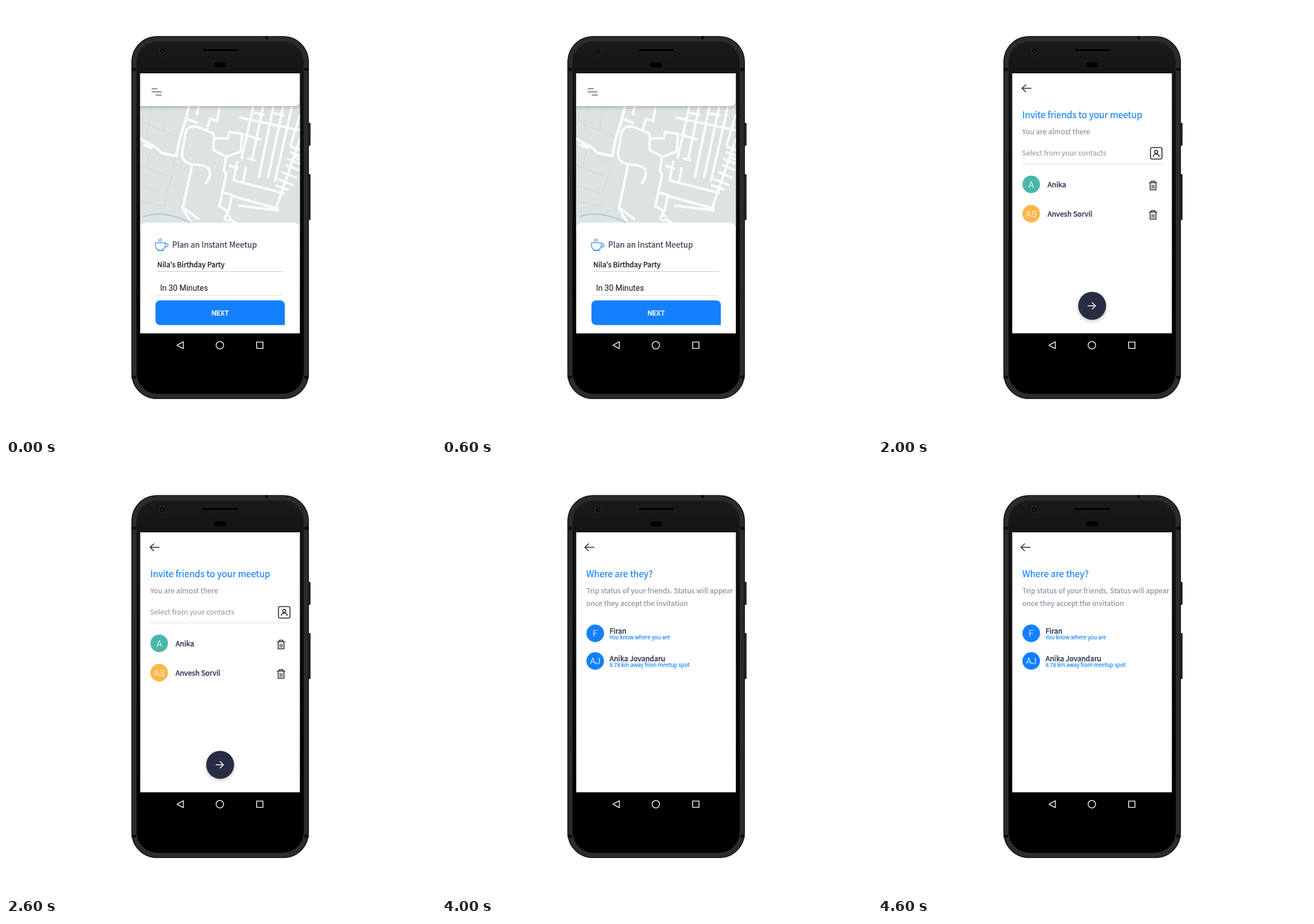
Animation of 748x749 px, one loop 5 s. Source, as an HTML page:

```html
<!DOCTYPE html>
<html lang="en">
<head>
<meta charset="utf-8">
<title>Meetup app tour</title>
<style>
html, body { margin: 0; width: 100%; height: 100%; overflow: hidden; background: #fff; }
svg { display: block; width: 748px; height: 749px; }
text {
  font: 12.4px "Noto Sans CJK JP", "Noto Sans CJK SC", "Open Sans", sans-serif;
  color: #8c8f9f; fill: currentColor; stroke: currentColor; stroke-width: .2;
}
text.title { font-size: 15.5px; color: #1480ff; }
text.dark { color: #222; stroke-width: .4; }
text.name { color: #292d50; stroke-width: .4; }
text.hint { color: #a0a0a0; }
text.note { font-size: 9.35px; color: #1480ff; }
text.bar { font-size: 9.5px; font-weight: 900; color: #fff; stroke-width: .35; }
text.place, text.street, text.initial, text.ui { font-family: Roboto, sans-serif; }
text.place { font-size: 12px; color: #5d8299; stroke: #eef2f2; stroke-width: 1.5; paint-order: stroke; }
text.street { font-size: 10px; color: #53686f; stroke: #fff; stroke-width: 2; paint-order: stroke; }
text.initial { font-size: 15.5px; font-weight: 300; color: #fff; }
.end { text-anchor: end; }
.mid { text-anchor: middle; }
.road, .line { fill: none; stroke: #fff; stroke-linecap: round; stroke-linejoin: round; }
.line { stroke: #2a2a2a; stroke-width: 1.6; }
.blue { fill: #1480ff; }
.lift { filter: drop-shadow(0 2px 3px #0004); }
.screen { display: none; }
.screen.on { display: inline; }
</style>
</head>
<body>
<svg viewBox="0 0 748 749">
<defs>
  <linearGradient id="face" x2="0" y2="1">
    <stop stop-color="#1a1a1a"/><stop offset=".1" stop-color="#141414"/>
    <stop offset=".5" stop-color="#080808"/><stop offset=".85"/>
  </linearGradient>
  <clipPath id="display"><path d="M233.500 117h277.700v451.700H233.500z"/></clipPath>
  <clipPath id="spotMap"><path d="M251 303h243.500v184H251z"/></clipPath>
  <g id="back" class="line"><path d="M266.500 143H251M257 137l-6.500 6 6.500 6"/></g>
  <g id="header">
    <path class="lift" d="M224 107h287v57q0 10-10 10H224z" fill="#fff"/>
    <path class="line" style="stroke:#646b7c" d="M254 143.700h9M254 149.200h16M261 154.700h9.500"/>
  </g>
  <g id="next">
    <circle class="lift" cx="372.500" cy="521" r="24.300" fill="#292d44"/>
    <path class="line" style="stroke:#fff" d="M365.500 521h12.500M372.500 515.500l5.700 5.500-5.700 5.500"/>
  </g>
  <g id="pin">
    <path d="M-5.500 4L0 13 5.500 4z" fill="#9ba3a6"/>
    <circle r="7" fill="#9ba3a6"/>
  </g>
  <g id="bin" class="line">
    <path d="M-6.500-5H6.500M-3-5v-2.500h6V-5M-5-4.500v12h10v-12"/>
    <path d="M-2-1v6M0-1v6M2-1v6" stroke-width="1"/>
  </g>
  <g id="stop"><rect x="-4" y="-4" width="8" height="8" rx="1.500" fill="#eef4f5" stroke="#6295ac" stroke-width="1.500"/><path d="M-2 0h4" stroke="#6295ac"/></g>
</defs>

<!-- Phone -->
<g>
  <rect x="525" y="203" width="4.500" height="40" rx="1" fill="#292929"/>
  <rect x="525" y="292" width="4.500" height="80" rx="1" fill="#292929"/>
  <path d="M529 204v38M529 293v78" stroke="#111"/>
  <rect x="218.300" y="52.500" width="308.500" height="630.500" rx="44" fill="#2b2b2b"/>
  <rect x="219" y="53.200" width="307" height="629" rx="43.300" fill="none" stroke="#151515" stroke-width="1.400"/>
  <path d="M218.500 110h7.500M519 110h7.500M218.500 645h7.500M519 645h7.500M453.500 52.500v5" stroke="#0b0b0b" stroke-width="5"/>
  <rect x="227" y="62" width="291" height="612" rx="37" fill="url(#face)"/>
  <path d="M227 100Q227 62 265 62H480Q518 62 518 100" fill="none" stroke="#202020"/>
  <rect x="342" y="74" width="62" height="5" rx="2.500" stroke="#2b2b2b" stroke-width=".7"/>
  <rect x="362" y="98" width="21" height="8.500" rx="4.200"/>
  <circle cx="272" cy="78" r="5" fill="#080808" stroke="#333"/>
  <path d="M270.500 76.500l3 3" stroke="#777"/>
  <path d="M233.500 568h277.700v43H233.500z"/>
  <g class="line" style="stroke:#e4e4e4">
    <path d="M308.500 583.500v12l-11-6zM436 584h11v11h-11z"/>
    <circle cx="372" cy="589.500" r="6.500"/>
  </g>
</g>

<g clip-path="url(#display)">
<path d="M233 117h279v452H233z" fill="#fff"/>

<!-- Plan -->
<g class="screen">
  <path d="M233 170h279v220H233z" fill="#dde3e3"/>
  <path class="road" style="stroke:#cdd5d6;stroke-width:1" d="M253 175l-4 32 53 21M279 175l-5 42M234 195l15 12-8 34M252 248l-8 33-10-4M244 281l35 14M240 313l35 14M258 250l29 25M294 262l-3 28-12 36-3 22-42-9"/>
  <path class="road" style="stroke-width:4.500" d="M318 175l-6 25-10 32-6 29-26-6-9-9-27-15M241 241l12 6"/>
  <path class="road" style="stroke-width:4" d="M348 308q9-12 6-22-2-8-20-10-29 0-28-21l7-37q5-11 20-8l27 11 2 9M323 279l-15 71 8 6 18 14M307 350l15 27M371 178l-4 22-12-4-6 21M316 197l17 6M335 175l-3 13M361 234l5-4h20l2-11 23 3-3 31-25 9-22-12zM383 262l-4 23 4 8-12 55 16 9 6-27 79 22M377 324l16 4M405 347l68 8M385 358l-2 8M390 371l12 7"/>
  <circle class="road" cx="385" cy="368" r="5" style="stroke-width:3"/>
  <path class="road" style="stroke-width:4" d="M408 194l103 22M430 176l-20 88M447 176l-19 91M465 176l-25 121M482 176l-26 121M497 176l-29 128M511 190l-16 52M402 271l-6 32 86 22M412 307l5-25M511 232l-42 122M390 278l13 4M421 265l11 3M416 224l27 8M433 186l15 3M468 187l15 3M501 262l10 5M497 245l14 5M495 254l16 6M491 266l20 8M488 277l21 8M481 289l23 9M474 301l24 10M470 312l20 7"/>
  <path class="road" style="stroke:#a9c7de;stroke-width:2" d="M240 366q32-13 82 11"/>
  <use href="#header"/>
  <rect x="233.500" y="376.500" width="277.500" height="220" rx="10" fill="#fff"/>
  <g class="line" style="stroke:#4797f5;stroke-width:1.400">
    <path d="M260 411.500h17q1 13-8.500 13T260 411.500M277 413q5-1 5 2.500t-6 3.500M265.500 409q2-2 0-4M269 409q2-3 0-5M264 425h10"/>
  </g>
  <text x="289" y="420" style="font-size:13.800px;color:#353a50">Plan an Instant Meetup</text>
  <text x="263" y="454" class="dark">Nila's Birthday Party</text>
  <path d="M263 461.500h219" stroke="#c8c8c8"/>
  <text x="268" y="494.500" class="ui" style="font-size:13.800px;color:#333">In 30 Minutes</text>
  <path d="M260 503.500h220" stroke="#ddd"/>
  <path class="blue" d="M269 511.500h207q9 0 9 9v34H269q-9 0-9-9v-25q0-9 9-9"/>
  <text x="372.500" y="538" class="ui mid" style="font-size:12px;font-weight:500;color:#fff">NEXT</text>
</g>

<!-- Spot -->
<g class="screen">
  <use href="#back"/>
  <text x="251" y="186" class="title">Set the meet-up spot</text>
  <text x="251" y="214.500">Where are you planning to meet?</text>
  <text x="251" y="244.500" class="dark">Leafmoor</text>
  <path d="M251 252h234" stroke="#e2e2e2"/>
  <text x="251" y="281.500" class="hint">House No, Floor No, Apartment Name</text>
  <path d="M251 289h233" stroke="#c8c8c8" stroke-width="1.500"/>
  <g clip-path="url(#spotMap)">
    <path d="M251 303h244v184H251z" fill="#dde2e4"/>
    <path class="road" style="stroke-width:2.500" d="M251 331l39-28M251 353l62-40M270 303l14 22 17 64M251 377l31-20 26-10M262 346l18 53 9 88M251 408l69-24M277 303l33 33M316 303l10 38 26-13M322 350l28-19M330 385l-13-52M329 385l33-6M322 409l48-13M251 432l37-8M251 459l42-11M285 420l42 15M297 414l-9 73M289 455l44-12M300 487l18-32 24 10M318 455l-7-23"/>
    <path class="road" style="stroke-width:2.500" d="M338 432l46-16M340 447l44-15M343 461l45-15M351 476l42-16M350 413l13 60M365 405l15 68M379 428l24 45M367 487l32-13M327 420l26 67"/>
    <path class="road" style="stroke-width:2.500" d="M359 326l136-14M362 342l133-11M369 362l126-15M380 377l114-12M406 392l89-10M408 410l87-10M390 423l105-12M393 440l102-17M397 456l98-17M402 473l93-18M408 487l87-17M385 303l7 60M403 303l9 108M437 303l9 121M471 303l12 133M412 411l9 76M447 397l-10 90M465 420l-12 67M480 416l-7 71"/>
    <path class="road" style="stroke-width:6" d="M337 303l23 49 15 43 9 45 20 47"/>
    <path class="road" style="stroke-width:4" d="M251 319l57-7 40-2 147-14M362 372l25 19"/>
    <path class="road" style="stroke:#a7c5de;stroke-width:5" d="M299 301l13 40 17 57 14 51 14 40"/>
    <path d="M382 393l27-3-1 21-12-1-1 3-18-5zM387 487l8-7 7 7z" fill="#98d778"/>
    <path class="road" style="stroke-width:1.500" d="M382 402l27-2"/>
    <use href="#pin" x="394" y="315"/><use href="#pin" x="436" y="346"/><use href="#pin" x="372" y="380"/>
    <path d="M392 312v6M396 312v6M392 315h4M433.500 343.500h5M436 343.500v6M369 377h6l-3 3zM372 380v3" stroke="#fff" fill="none"/>
    <text x="383" y="317.500" class="place end" style="font-size:11.500px">Zelm Hospital</text>
    <text x="361" y="382" class="place end" style="font-size:11.500px">Leafmoor</text>
    <text class="street" transform="translate(388 387)rotate(-3)">9th B Hill Ln</text>
    <text class="street" transform="translate(417 416.500)rotate(-3)">17th Hill Rd</text>
    <text class="street" transform="translate(455 305)rotate(86)">9th Fern</text>
    <text class="street" transform="translate(437 481)rotate(-78)">6th Fern Ln</text>
    <text class="street" transform="translate(281 402)rotate(77)">Inspector O V Na</text>
    <path d="M389 380v11" stroke="#e79b17" stroke-width="2.500"/>
    <circle cx="389" cy="374.500" r="8" fill="#fbb90b"/>
    <circle cx="389" cy="372" r="2" fill="#ffdc72"/>
    <circle cx="281" cy="472" r="9" fill="#666"/>
  </g>
  <use href="#next"/>
</g>

<!-- Invite -->
<g class="screen">
  <use href="#back"/>
  <text x="251" y="194.500" class="title">Invite friends to your meetup</text>
  <text x="251" y="223">You are almost there</text>
  <text x="250.500" y="259.500" class="hint">Select from your contacts</text>
  <path d="M251 274.500h244" stroke="#ddd"/>
  <g class="line">
    <rect x="474" y="246" width="20" height="20" rx="3"/>
    <circle cx="484" cy="253.500" r="2.700"/>
    <path d="M479 261.500q0-4 5-4t5 4"/>
  </g>
  <circle cx="266.500" cy="310" r="15.300" fill="#4bb7a9"/>
  <text x="266.500" y="315.500" class="initial mid">A</text>
  <text x="295" y="314.500" class="name">Anika</text>
  <use href="#bin" x="478.500" y="312"/>
  <circle cx="266.500" cy="361" r="15.300" fill="#ffb54b"/>
  <text x="266.500" y="366.500" class="initial mid">AS</text>
  <text x="295" y="365.500" class="name">Anvesh Sorvil</text>
  <use href="#bin" x="478.500" y="363"/>
  <use href="#next"/>
</g>

<!-- Live map -->
<g class="screen">
  <path d="M233 170h279v360H233z" fill="#dde3e3"/>
  <path class="road" style="stroke-width:3.500" d="M252 175l15 24 48 17M267 199l2-24M290 175l-7 39M305 175l-9 58M320 175l-11 63M337 175l-9 68M353 190l-9 55M286 189l55 13M281 210l97 23M314 243l67 15M370 202l-12 54M392 210l-15 58M410 215l-21 54M425 212l-17 37M359 219l52 14M374 240l30 8M287 275l8 17M314 276l40 7M288 277l27 2 8 17"/>
  <circle class="road" cx="300" cy="299" r="5" style="stroke-width:3.500"/>
  <path class="road" style="stroke-width:4" d="M234 311l83 27 41 13 12 14 37 37M306 298l35 16 22 28 10 24"/>
  <path class="road" style="stroke-width:3.500" d="M234 351l124 38M234 378l48 16M258 360l-24 71M278 367l-34 102M300 373l-35 105M321 380l-45 137M341 385l-43 131M359 390l-39 103M380 402l-37 68M246 429l90 28M242 456l76 28M234 485l77 27M234 505l68 22M361 391l34 14M327 430l28 10"/>
  <path class="road" style="stroke-width:3.500" d="M511 306l-76 128-58 94M511 345l-95 160M511 390l-70 138M511 429l-49 99M480 320l31 20M471 337l40 28M459 357l52 33M450 372l61 41M435 404l76 45M422 425l78 43M411 447l76 37M390 466l79 43M371 488l77 40M352 507l34 21M418 340l14-5 7-22M430 336l10 11M500 307l11-22M481 300l22 11"/>
  <path class="road" style="stroke:#bccdd2;stroke-width:11" d="M516 230l-25 47-24 48-20 35-42 52-42 47-73 83"/>
  <path class="road" style="stroke:#afd0e2;stroke-width:1.500" d="M234 315l125 38M409 407q25 9 27 38t30 49M511 514q-40-11-66 14"/>
  <path class="road" style="stroke:#9bd47c;stroke-width:8;stroke-linecap:butt" d="M233 324l73 21 51 20"/>
  <use href="#stop" x="406" y="411"/><use href="#stop" x="316.500" y="499"/>
  <use href="#pin" x="501" y="192"/><use href="#pin" x="456" y="285"/><use href="#pin" x="440" y="361"/><use href="#pin" x="371" y="398"/><use href="#pin" x="477" y="460"/>
  <path d="M497.500 189.500h7v5h-7zM452.500 282.500h7v5h-7zM437.500 360h5v4h-5zM368.500 397h5v4h-5z" fill="#eef1f1"/>
  <path class="road" d="M438.500 360q1.500-4 3 0M369.500 397q1.500-4 3 0"/>
  <text x="487" y="193" class="place end">Ornel Bank Velimandra,</text>
  <text x="487" y="207.500" class="place end">Main Road Dorvenhal...</text>
  <text x="443" y="293.500" class="place end">Arlo Smoking Point</text>
  <g class="mid">
    <text x="285.500" y="331.500" class="place">KV Dalmoran</text>
    <text x="285.500" y="346" class="place">North</text>
    <text x="285.500" y="360.500" class="place">City Park</text>
  </g>
  <text x="358" y="395.500" class="place end">Quillenar Mall</text>
  <text x="464" y="457.500" class="place end">Benovarr faith</text>
  <text x="464" y="472" class="place end">prayer house</text>
  <text class="street" transform="translate(252 436)rotate(-70)">7th Fern Ln</text>
  <text class="street" transform="translate(236 517)rotate(17)">Tolvarsha Rd</text>

  <circle class="blue" cx="297" cy="254" r="21.700"/>
  <path d="M286 265V247q0-13 11-13t12 13v18q-11 4-23 0" fill="#eeb055"/>
  <path d="M282 269q4-6 11-7h8q7 1 11 7-14 14-30 0" fill="#5a3540"/>
  <path d="M293 257h8v7l-4 4-4-4z" fill="#e9b48e"/>
  <ellipse cx="297" cy="251" rx="6.500" ry="9" fill="#ffd5b0"/>
  <path d="M290 251q0-12 10-13 6 4 5 12-4-2-6-8-3 7-9 9" fill="#f4bb61"/>
  <path d="M289 265l8 4 8-4v5l-8-1-8 1z" fill="#fff"/>
  <path d="M294 251h1M299 251h1M295 256q2 1 4 0" fill="none" stroke="#633" stroke-linecap="round"/>
  <circle class="blue" cx="366.500" cy="294" r="21.700"/>
  <path d="M350 308q3-6 11-6h11q8 0 11 6-16 15-33 0" fill="#8bc72e"/>
  <path d="M362 298h9v6q-4 5-9 0z" fill="#e5a984"/>
  <ellipse cx="366.500" cy="291" rx="8" ry="10" fill="#fac7a2"/>
  <path d="M358 290q-3-14 9-13 11-1 8 13l-2-6q-7 1-11-2z" fill="#5b3137"/>
  <path d="M363 290h1M369 290h1M364.500 297q2 1 4 0" fill="none" stroke="#633" stroke-linecap="round"/>

  <path class="blue lift" d="M262 436.500h44q9 0 9 9v53h-53q-9 0-9-9v-44q0-9 9-9"/>
  <text x="284" y="474.500" class="bar mid" style="font-size:17px">SOS</text>
  <g class="lift" fill="#fff">
    <circle cx="473.500" cy="389" r="17.800"/><circle cx="473.500" cy="441" r="17.800"/><circle cx="473.500" cy="493" r="17.800"/>
  </g>
  <circle cx="467" cy="382" r="4" fill="#303b50"/><circle cx="481" cy="382" r="4" fill="#e9b757"/>
  <circle cx="467" cy="384" r="3" fill="#efbd98"/><circle cx="481" cy="384" r="3" fill="#f3c7a4"/>
  <path d="M461 396q0-9 6-9t6 9z" fill="#424c62"/><path d="M475 396q0-9 6-9t5 9z" fill="#f0b64c"/>
  <circle cx="473" cy="389" r="5.500" fill="#e64d3e"/><circle cx="473" cy="391" r="3" fill="#f8c8a5"/>
  <path d="M464 401q2-7 9-7t9 7z" fill="#e64d3e"/>
  <g class="line" style="stroke:#1480ff">
    <circle class="blue" cx="473.500" cy="441" r="1.500"/>
    <path d="M470.500 437q-3 4 0 8M476.500 437q3 4 0 8M467.500 435.500q-4 5.500 0 11M479.500 435.500q4 5.500 0 11M465 434q-4 7 0 14M482 434q4 7 0 14"/>
  </g>
  <path class="blue" d="M480 487.500l-6 14-2-6.500-6.500-2z"/>
  <use href="#header"/>
  <path class="blue" d="M233 528.500h279V569H233z"/>
  <text x="252" y="546" class="bar">Meetup in Tea Velimandora for Nila's</text>
  <text x="252" y="559" class="bar">Birthday at 06:00 PM</text>
  <text x="484" y="552" class="bar end">EXIT</text>
</g>

<!-- Status -->
<g class="screen">
  <use href="#back" x="-2"/>
  <text x="251" y="194.500" class="title">Where are they?</text>
  <text x="251" y="223">Trip status of your friends. Status will appear</text>
  <text x="251" y="244.500">once they accept the invitation</text>
  <circle class="blue" cx="266.500" cy="292.500" r="15.300"/>
  <text x="266.500" y="298" class="initial mid">F</text>
  <text x="291.500" y="292.500" class="name">Firan</text>
  <text x="291.500" y="302.500" class="note">You know where you are</text>
  <circle class="blue" cx="266.500" cy="340.500" r="15.300"/>
  <text x="266.500" y="346" class="initial mid">AJ</text>
  <text x="291.500" y="340.500" class="name">Anika Jovandaru</text>
  <text x="291.500" y="350.500" class="note">8.78 km away from meetup spot</text>
</g>
</g>
</svg>
<script>
const screens = document.querySelectorAll(".screen");
const hold = 1000;

function draw(now) {
  const current = Math.floor(now / hold) % screens.length;
  screens.forEach((screen, i) => screen.classList.toggle("on", i === current));
  requestAnimationFrame(() => draw(performance.now()));
}
draw(0);
</script>
</body>
</html>
```
